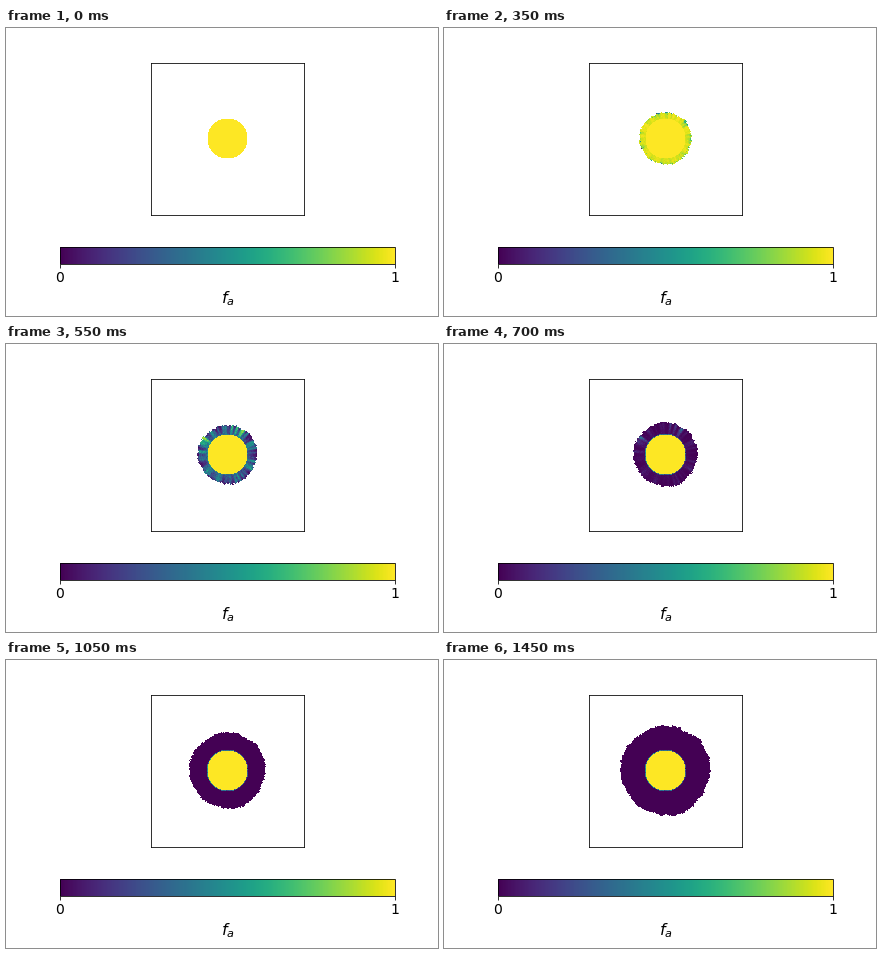
These frames come from a looping animation (432x288 px, 1.5 s). A matplotlib script:

```python
import numpy as np
import matplotlib.pyplot as plt
from matplotlib.animation import FuncAnimation

W, H, DPI = 432, 288, 72
FRAMES, INTERVAL = 30, 50
N = 152            # lattice cells per side, about one pixel each
R0 = 19.5          # radius of the initial colony
SPEED = 0.845      # front advance per frame
rng = np.random.default_rng(7)


def angular_noise(theta, low, high, power):
    """Random periodic function of the angle with unit variance."""
    k = np.arange(low, high)
    amp = k ** -power
    amp *= np.sqrt(2 / np.sum(amp ** 2))
    phase = rng.uniform(0, 2 * np.pi, k.size)
    return sum(a * np.cos(n * theta + p) for a, n, p in zip(amp, k, phase))


def sector(theta, degrees, width):
    """Smooth bump around one direction."""
    d = np.angle(np.exp(1j * (theta - np.radians(degrees))))
    return np.exp(-(d / np.radians(width)) ** 2)


axis = np.arange(N) - (N - 1) / 2
x, y = np.meshgrid(axis, -axis)
r, theta = np.hypot(x, y), np.arctan2(y, x)

# Rough front: wide bumps plus single-cell jitter
bumps = angular_noise(theta, 3, 50, 0.9)
jitter = rng.uniform(-0.7, 0.7, r.shape)

# Frame at which each cell's surroundings lose activity
depth = np.clip((r - R0) / 9, 0, 1.2)
lineage = 0.75 * angular_noise(theta, 8, 45, 0.3)
for angle in (36, -3, -53, -93, -162, 112):
    lineage -= 1.7 * sector(theta, angle, 7)
for angle in (147, 60):
    lineage += 1.5 * sector(theta, angle, 8)
fade = 10.3 + lineage * (0.3 + 0.9 * depth) + rng.normal(0, 0.25, r.shape)
edge_noise = rng.exponential(1.0, r.shape)

core = r <= R0
rim = (r > R0) & (r < R0 + 0.8)
rim_level = np.clip(0.35 - 0.12 * np.cos(theta) + rng.normal(0, 0.1, r.shape), 0, 1)


def field(i):
    grown = SPEED * i
    front = R0 + grown + 0.14 * np.sqrt(grown) * bumps + min(1, grown) * jitter
    near_front = np.clip(1 - (front - r) / 2, 0, 1)
    f = 1 / (1 + np.exp((i - fade + near_front * edge_noise) / 1.1))
    f = np.where(rim, np.maximum(f, rim_level), f)
    f[core] = 1
    return np.ma.masked_where(~core & (r > front), f)


def place(left, top, width, height):
    return fig.add_axes([left / W, 1 - (top + height) / H, width / W, height / H])


fig = plt.figure(figsize=(W / DPI, H / DPI), dpi=DPI, facecolor="white")
ax = place(145.3, 34.56, 152.25, 152.25)
ax.set(xticks=[], yticks=[])
image = ax.imshow(field(0), cmap="viridis", vmin=0, vmax=1,
                  interpolation="nearest", aspect="auto")

cax = place(54, 219.4, 334.8, 16.74)
bar = fig.colorbar(image, cax=cax, orientation="horizontal", ticks=[0, 1])
bar.ax.set_xticklabels(["0", "1"], fontsize=14)
bar.set_label("$f_a$", fontsize=16)


def update(i):
    image.set_data(field(i))
    return [image]


anim = FuncAnimation(fig, update, frames=FRAMES, interval=INTERVAL,
                     repeat=True, repeat_delay=0, blit=False)
plt.show()
```
